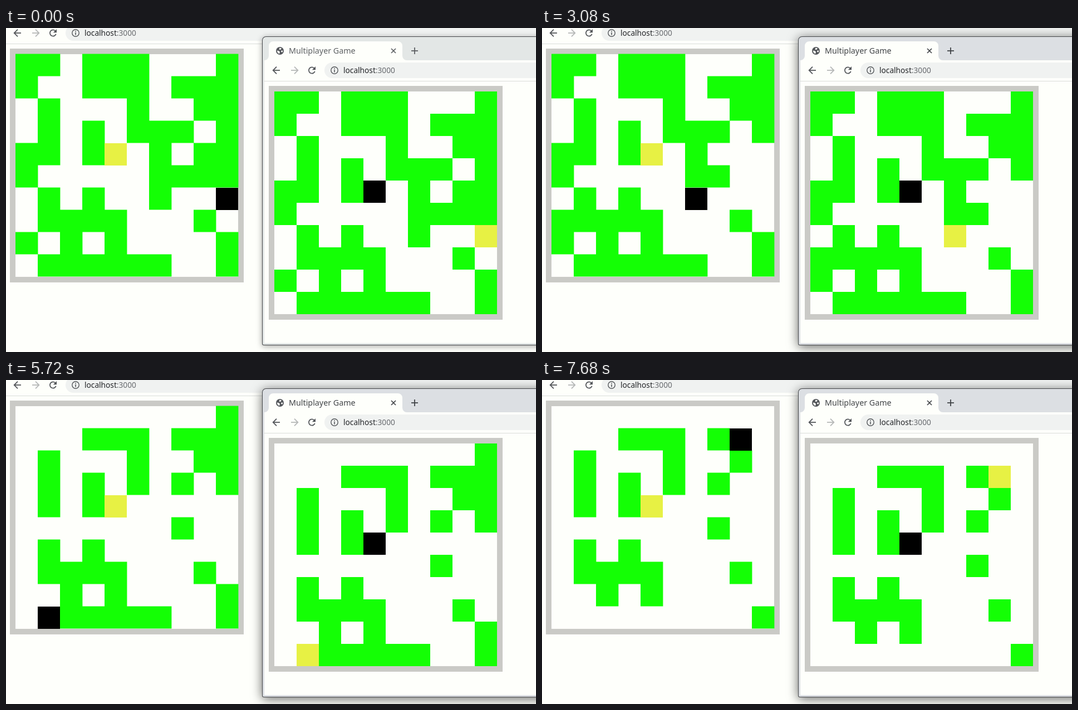
These frames come from a looping animation (952x582 px, 8 s). An HTML page with a canvas:

```html
<!DOCTYPE html>
<html lang="en">
<head>
<meta charset="utf-8">
<title>Multiplayer Game</title>
<style>
  html, body { margin: 0; width: 100%; height: 100%; overflow: hidden; background: #fefffb; }
  canvas { display: block; }
</style>
</head>
<body>
<canvas id="stage" width="952" height="582"></canvas>
<script>
const ctx = document.getElementById('stage').getContext('2d');
const LOOP = 8000, FOCUS_AT = 640, LAG = 40, CELL = 40;
const PAPER = '#fefffb', GREEN = '#14ff05', YELLOW = '#e7f144', BLACK = '#000';
const INK = '#54575b', FONT = '"Noto Sans", "Open Sans", sans-serif';

const MAP = [
  '1101110001',
  '1001110111',
  '0100010011',
  '0101011101',
  '1101001011',
  '1000001111',
  '0101001000',
  '0111100010',
  '1010100001',
  '0111111001'
];
const START = [9, 6], RIVAL = [4, 4];
const DIRS = { U: [0, -1], D: [0, 1], L: [-1, 0], R: [1, 0] };

// "time:steps"; a star means the left window shows the move a little later
const MOVES = (
  '1720:U* 1880:U* 2080:L 2240:D 2520:D* 2800:L 3080:L 3200:U 3320:U 3520:U ' +
  '4080:U 4120:UU 4240:L 4680:L 4720:L 4760:LL 4800:L 4920:D ' +
  '5400:D 5440:D 5480:DD 5520:D 5560:D 5600:DD 5720:R ' +
  '6240:R 6280:RR 6320:R 6360:RR 6400:RR 6520:U ' +
  '6960:U 7000:U 7040:UU 7080:U 7120:U 7200:UU 7400:L* 7680:D'
).split(' ').map(m => {
  const [time, steps] = m.split(':');
  return { time: +time, steps: steps.replace('*', ''), late: steps.endsWith('*') };
});
const GROWTH = [[2800, 0, 7], [6880, 9, 9]];

function stateAt(t, isLeft) {
  const grid = MAP.map(row => [...row].map(Number));
  let [x, y] = START;
  for (const { time, steps, late } of MOVES) {
    if (t < time + (isLeft && late ? LAG : 0)) break;
    for (const s of steps) {
      x += DIRS[s][0];
      y += DIRS[s][1];
      // food that grows after this visit is kept
      grid[y][x] = GROWTH.some(g => g[0] > time && g[0] <= t && g[1] === x && g[2] === y) ? 1 : 0;
    }
  }
  for (const [time, gx, gy] of GROWTH) {
    const eaten = time < 5000 && t >= 5600;
    if (t >= time && !eaten) grid[gy][gx] = x === gx && y === gy ? 0 : 1;
  }
  return { grid, x, y };
}

function rect(color, x, y, w, h) {
  ctx.fillStyle = color;
  ctx.fillRect(x, y, w, h);
}

function round(color, x, y, w, h, r) {
  ctx.fillStyle = color;
  ctx.beginPath();
  ctx.roundRect(x, y, w, h, r);
  ctx.fill();
}

function line(color, width, ...pts) {
  ctx.strokeStyle = color;
  ctx.lineWidth = width;
  ctx.beginPath();
  for (let i = 0; i < pts.length; i += 2) ctx.lineTo(pts[i], pts[i + 1]);
  ctx.stroke();
}

function ring(color, width, x, y, r, from = 0, to = Math.PI * 2) {
  ctx.strokeStyle = color;
  ctx.lineWidth = width;
  ctx.beginPath();
  ctx.arc(x, y, r, from, to);
  ctx.stroke();
}

function poly(color, ...pts) {
  ctx.fillStyle = color;
  ctx.beginPath();
  for (let i = 0; i < pts.length; i += 2) ctx.lineTo(pts[i], pts[i + 1]);
  ctx.fill();
}

function text(str, x, y, size, color) {
  ctx.font = size + 'px ' + FONT;
  ctx.fillStyle = color;
  ctx.fillText(str, x, y);
  return x + ctx.measureText(str).width;
}

function arrow(color, x, y, dir) {
  line(color, 1.8, x - 6.5 * dir, y, x + 6 * dir, y);
  line(color, 1.8, x, y - 6.3, x - 6.3 * dir, y, x, y + 6.3);
}

function toolbar() {
  rect(PAPER, -1, -9, 960, 37);
  round('#f0f2f1', 107, -5, 900, 28, 14);
  arrow(INK, 21, 9, 1);
  arrow('#b6b8b8', 53, 9, -1);
  ring(INK, 1.8, 84.5, 9, 5.6, 0.35, Math.PI * 1.75);
  poly(INK, 91, 2, 91, 8.2, 84.8, 8.2);
  ring(INK, 1.4, 125, 9, 6.2);
  rect(INK, 124.2, 8, 1.6, 4.5);
  rect(INK, 124.2, 5.2, 1.6, 1.7);
  const end = text('localhost', 141, 14, 13.7, '#222427');
  text(':3000', end, 14, 13.7, '#686b6f');
  rect('#dadcda', -1, 28, 960, 1);
}

function board({ grid, x, y }, mine, other, soft) {
  rect('#cacac6', 7, 37, 420, 420);
  rect(PAPER, 17, 47, 400, 400);
  ctx.save();
  ctx.translate(17, 47);
  ctx.beginPath();
  grid.forEach((row, r) => row.forEach((on, c) => {
    if (on) ctx.rect(c * CELL, r * CELL - soft, CELL + soft, CELL);
  }));
  ctx.fillStyle = GREEN;
  ctx.fill();
  rect(other, RIVAL[0] * CELL, RIVAL[1] * CELL, CELL, CELL);
  rect(mine, x * CELL, y * CELL, CELL, CELL);
  ctx.restore();
}

function globe(x, y, back) {
  ctx.fillStyle = INK;
  ctx.beginPath();
  ctx.arc(x, y, 7, 0, Math.PI * 2);
  ctx.fill();
  poly(back, x - 5.4, y - 0.5, x - 1.5, y + 0.2, x, y + 2.2, x - 1, y + 5.4, x - 4, y + 3.6);
  poly(back, x - 0.5, y - 5.4, x + 3, y - 4.4, x + 1.2, y - 2, x - 1.5, y - 2.2);
  poly(back, x + 2, y - 0.2, x + 5.4, y - 0.6, x + 4.6, y + 2.8, x + 2.4, y + 2);
}

function frame(focused) {
  const strip = focused ? '#dcdfe3' : '#e3e7e6';
  ctx.save();
  ctx.shadowColor = focused ? 'rgba(0,0,0,.6)' : 'rgba(0,0,0,.36)';
  ctx.shadowBlur = focused ? 19 : 11;
  ctx.shadowOffsetY = focused ? 3 : 2;
  round('#45474a', 460, 15, 540, 555, [7, 0, 0, 3]);
  ctx.restore();
  round(strip, 461, 16, 540, 553, [6, 0, 0, 2]);
  rect(PAPER, 464, 58, 500, 508);

  // tab with flared feet
  ctx.fillStyle = PAPER;
  ctx.beginPath();
  ctx.moveTo(464, 58);
  ctx.arcTo(472, 58, 472, 50, 8);
  ctx.arcTo(472, 24, 480, 24, 8);
  ctx.arcTo(712, 24, 712, 32, 8);
  ctx.arcTo(712, 58, 720, 58, 8);
  ctx.lineTo(720, 58);
  ctx.fill();

  const ink = focused ? '#404347' : '#5c5f62';
  globe(492, 41, PAPER);
  text('Multiplayer Game', 508, 46, 14.3, ink);
  line(ink, 1.7, 692, 37, 700, 45);
  line(ink, 1.7, 700, 37, 692, 45);
  line(ink, 1.8, 728, 41, 740, 41);
  line(ink, 1.8, 734, 35, 734, 47);
}

function draw(t) {
  rect(PAPER, 0, 0, 952, 582);
  toolbar();
  board(stateAt(t, true), BLACK, YELLOW, 0.4);

  frame(t >= FOCUS_AT);
  ctx.save();
  ctx.beginPath();
  ctx.rect(464, 58, 488, 508);
  ctx.clip();
  ctx.translate(465, 67);
  toolbar();
  board(stateAt(t, false), YELLOW, BLACK, 0);
  ctx.restore();
}

const begin = performance.now();
function tick() {
  draw((performance.now() - begin) % LOOP);
  requestAnimationFrame(tick);
}
tick();
</script>
</body>
</html>
```
